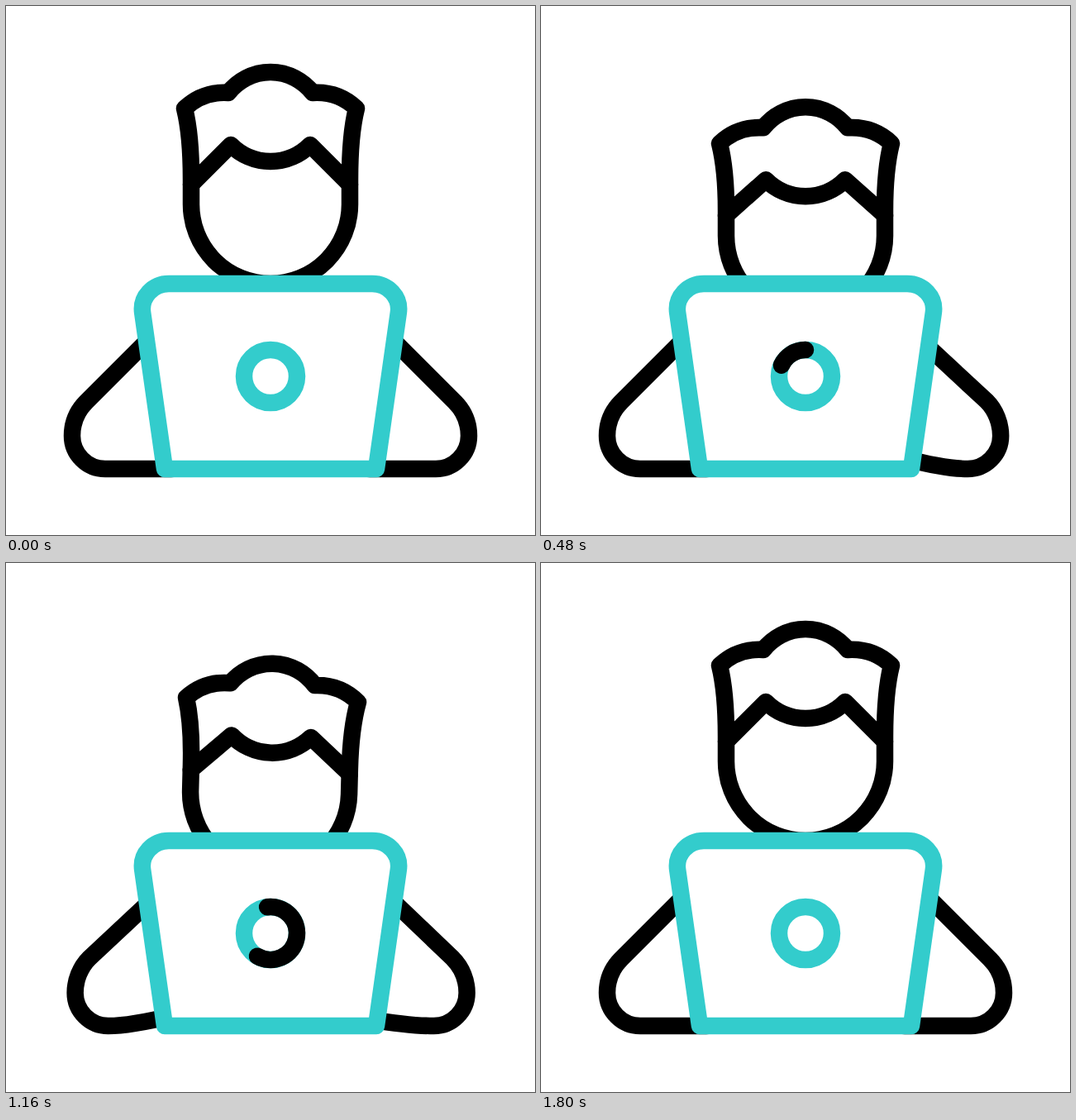
Write an HTML page that moves like this. It is 640 by 640 pixels and loops after 2000 ms.

```html
<!DOCTYPE html>
<html lang="en">
<head>
<meta charset="utf-8">
<title>Typing at a laptop</title>
<style>
  html, body { margin: 0; width: 100%; height: 100%; overflow: hidden; background: #fff; }
  svg { display: block; width: 100%; height: 100%; }
  path, circle { fill: none; stroke: #000; stroke-width: 20.5; stroke-linecap: round; stroke-linejoin: round; }
  .laptop { stroke: #33cccc; fill: #fff; }
</style>
</head>
<body>
<svg viewBox="0 0 640 640">
  <path id="left"/>
  <g transform="matrix(-1 0 0 1 640 0)"><path id="right"/></g>
  <g id="head"><path id="face"/><path id="fringe"/></g>
  <path class="laptop" d="M192 560L165.3 372C162 352 178 336 197 336H443C462 336 478 352 474.7 372L448 560Z"/>
  <circle class="laptop" cx="320" cy="448" r="32"/>
  <path id="loader"/>
</svg>
<script>
  const LOOP = 2000, STEP = 40;
  const [left, right, head, face, fringe, loader] =
    ['left', 'right', 'head', 'face', 'fringe', 'loader'].map(id => document.getElementById(id));

  const ease = (t, from, to) => {
    const u = Math.min(1, Math.max(0, (t - from) / (to - from)));
    return u * u * (3 - 2 * u);
  };

  // Eased value through [time, value] keys
  const track = (t, keys) => keys.slice(1).reduce(
    (v, [time, value], i) => v + (value - keys[i][1]) * ease(t, keys[i][0], time), keys[0][1]);

  const DROP = [[40, 0], [280, 42.3], [660, 42.3], [1000, 48], [1700, 0]];
  const TILT = [[500, 0], [760, -4.4], [1010, -0.4], [1160, 1.5], [1340, 0.3], [1700, 0]];

  // Repeated key press, 0 at rest and 1 fully in
  const press = (t, start, count, power) =>
    t < start || t >= Math.min(1720, start + count * 420) ? 0
      : Math.pow(Math.sin(Math.PI * (t - start) / 420), 2 * power);

  const armPath = k => {
    const x = 4.2 * k;
    return `M175 ${401 + 9 * k}L${97 + x} ${479 - k}` +
      `C${86 + x} ${490 - k} ${80 + x} 505 ${80 + x} 520` +
      `C${80 + x} 542 ${98 + x} 560 ${120 + x} 560` +
      `C${142 + x} 560 172 ${560 - 6 * k} 200 ${560 - 14 * k}`;
  };

  function drawHead(t) {
    const d = track(t, DROP), side = 0.88 * d, chin = 240 + 0.9 * d;
    face.setAttribute('d',
      `M216 ${124 + d}Q238 ${103 + d} 269 ${105 + d}A64.5 64.5 0 0 1 371 ${105 + d}` +
      `Q402 ${103 + d} 424 ${124 + d}C418 ${148 + d} 416 ${180 + d} 416 ${210 + side}` +
      `V${chin}A96 96 0 0 1 224 ${chin}V${210 + side}` +
      `C224 ${180 + d} 222 ${148 + d} 216 ${124 + d}Z`);
    fringe.setAttribute('d',
      `M224 ${216 + side}L272 ${168 + d}A67.6 67.6 0 0 0 368 ${168 + d}L416 ${216 + side}`);
    head.setAttribute('transform', `rotate(${track(t, TILT)} 320 243)`);
  }

  // Counterclockwise angle from the top of the ring
  const ringPoint = deg => {
    const a = deg * Math.PI / 180;
    return `${320 - 32 * Math.sin(a)} ${448 - 32 * Math.cos(a)}`;
  };

  function drawLoader(t) {
    const tail = 367 * ease(t, 660, 1800), tip = 367 * ease(t, 230, 1160);
    const large = tip - tail > 180 ? 1 : 0;
    loader.setAttribute('d', tip > tail
      ? `M${ringPoint(tail)}A32 32 0 ${large} 0 ${ringPoint(tip)}` : '');
  }

  function draw(now) {
    const t = Math.floor(now % LOOP / STEP) * STEP;
    left.setAttribute('d', armPath(press(t, 60, 4, 1)));
    right.setAttribute('d', armPath(press(t, 222, 3, 0.7)));
    drawHead(t);
    drawLoader(t);
  }

  const start = performance.now();
  function tick() {
    draw(performance.now() - start);
    requestAnimationFrame(tick);
  }
  tick();
</script>
</body>
</html>
```
